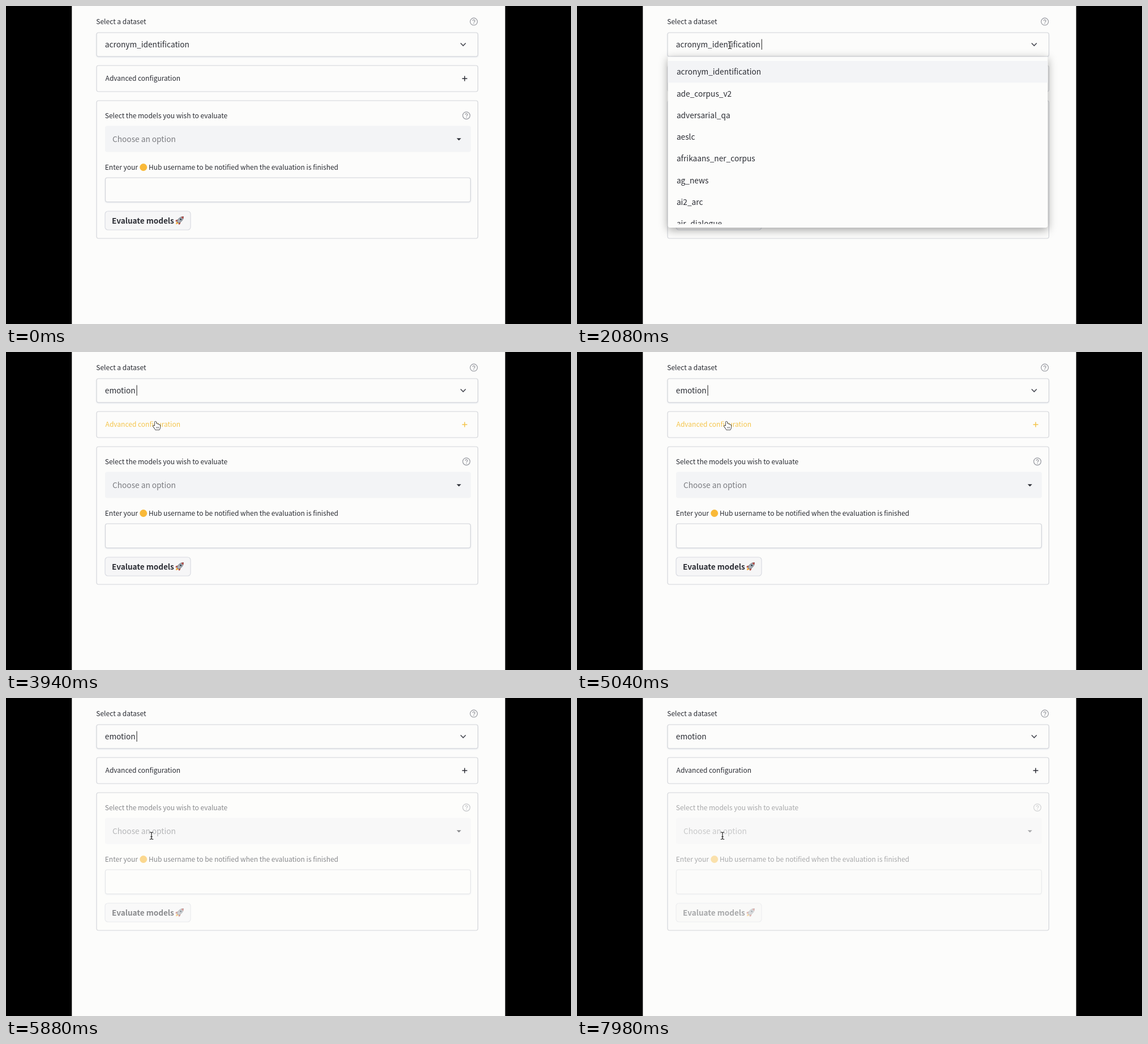
An HTML page with a canvas that plays this animation: 998x561 px, repeating every 8 s.

```html
<!DOCTYPE html>
<html lang="en">
<head>
<meta charset="utf-8">
<title>Model evaluation form</title>
<style>
  html, body { margin: 0; width: 100%; height: 100%; overflow: hidden; background: #000; }
  canvas { display: block; width: 998px; height: 561px; }
</style>
</head>
<body>
<canvas id="stage"></canvas>
<script>
const W = 998, H = 561, LOOP = 8000;
const canvas = document.getElementById('stage');
const ctx = canvas.getContext('2d');
const dpr = window.devicePixelRatio || 1;
canvas.width = W * dpr;
canvas.height = H * dpr;

const FONT = '"Noto Sans CJK JP", "Noto Sans CJK SC", "Noto Sans CJK KR", "Noto Sans CJK", "Noto Sans", sans-serif';
const BODY = `13.7px ${FONT}`;
const LABEL = `12px ${FONT}`;
const BOLD = `600 13.55px ${FONT}`;
const INK = '#2b2d34', PAPER = '#fcfcfb', LINE = '#d3d5da', ACCENT = '#f4c54c';

const DATASETS = ['acronym_identification', 'ade_corpus_v2', 'adversarial_qa', 'aeslc',
  'afrikaans_ner_corpus', 'ag_news', 'ai2_arc', 'air_dialogue'];
const MATCHES = ['emotion', 'mteb/emotion', 'SetFit/emotion', 'Tolvo/emotion_nl',
  'Hamzo/emotion-raw', 'lumoko/emotion-with-length', 'Datatang/Emotional_Video_Data',
  'vesatorimeh/emotion-with-length'];

// Event times in ms
const FOCUS = 900, OPEN = 1700, PICK = 3630, FADE = 5040, BLINK = 1100;
const KEYS = [2440, 2520, 2600, 2680, 2760, 2880, 2960];

// Pointer stops: time, x, y
const PATH = [[40, 568, 463], [800, 270, 69], [3340, 270, 69], [3560, 264, 123],
  [5180, 264, 123], [5600, 257, 243]];

const clamp = v => Math.min(1, Math.max(0, v));
const smooth = v => v * v * (3 - 2 * v);

function pointerAt(t) {
  if (t < PATH[0][0] || (t >= KEYS[0] && t < 3340)) return null;
  let i = 0;
  while (i < PATH.length - 2 && t >= PATH[i + 1][0]) i++;
  const [t0, x0, y0] = PATH[i], [t1, x1, y1] = PATH[i + 1];
  const k = smooth(clamp((t - t0) / (t1 - t0)));
  return { x: x0 + (x1 - x0) * k, y: y0 + (y1 - y0) * k };
}

function text(str, x, y, font = BODY, color = INK) {
  ctx.font = font;
  ctx.fillStyle = color;
  ctx.fillText(str, x, y);
}

function box(x, y, w, h, r, fill, stroke) {
  ctx.beginPath();
  ctx.roundRect(x, y, w, h, r);
  if (fill) { ctx.fillStyle = fill; ctx.fill(); }
  if (stroke) { ctx.strokeStyle = stroke; ctx.lineWidth = 1.2; ctx.stroke(); }
}

// Fill with a soft shadow below it
function raised(color, blur, dy, ...shape) {
  ctx.save();
  ctx.shadowColor = color;
  ctx.shadowBlur = blur * dpr;
  ctx.shadowOffsetY = dy * dpr;
  box(...shape, PAPER);
  ctx.restore();
}

function input(x, y, w, h) {
  raised('rgba(120,135,170,.3)', 2.5, 1, x, y, w, h, 3.5);
  box(x, y, w, h, 3.5, PAPER, LINE);
}

function line(points, color, width) {
  ctx.beginPath();
  points.forEach(([x, y], i) => i ? ctx.lineTo(x, y) : ctx.moveTo(x, y));
  ctx.strokeStyle = color;
  ctx.lineWidth = width;
  ctx.stroke();
}

function disc(x, y, r, color) {
  ctx.beginPath();
  ctx.arc(x, y, r, 0, 7);
  ctx.fillStyle = color;
  ctx.fill();
}

function help(x, y) {
  ctx.beginPath();
  ctx.arc(x, y, 6.4, 0, 7);
  ctx.strokeStyle = '#96989f';
  ctx.lineWidth = 1.2;
  ctx.stroke();
  ctx.beginPath();
  ctx.arc(x, y - 1.4, 1.9, Math.PI, Math.PI * 2.35);
  ctx.lineTo(x, y + 1.5);
  ctx.stroke();
  disc(x, y + 3.5, 0.8, '#96989f');
}

function rocket(x, y) {
  ctx.save();
  ctx.translate(x, y);
  ctx.rotate(Math.PI / 4);
  ctx.fillStyle = '#f2a83b';
  ctx.beginPath();
  ctx.moveTo(-2, 4);
  ctx.quadraticCurveTo(-2.4, 7, 0, 9.5);
  ctx.quadraticCurveTo(2.4, 7, 2, 4);
  ctx.fill();
  ctx.fillStyle = '#b6463f';
  ctx.beginPath();
  ctx.moveTo(-2, 0);
  ctx.lineTo(-5, 3.5);
  ctx.lineTo(-4.6, 6.5);
  ctx.lineTo(0, 4);
  ctx.lineTo(4.6, 6.5);
  ctx.lineTo(5, 3.5);
  ctx.lineTo(2, 0);
  ctx.fill();
  ctx.fillStyle = '#a9b0b8';
  ctx.strokeStyle = '#5e6670';
  ctx.lineWidth = 0.7;
  ctx.beginPath();
  ctx.moveTo(0, -9.5);
  ctx.bezierCurveTo(4.4, -5, 3.8, 1, 2.2, 4.8);
  ctx.lineTo(-2.2, 4.8);
  ctx.bezierCurveTo(-3.8, 1, -4.4, -5, 0, -9.5);
  ctx.fill();
  ctx.stroke();
  ctx.fillStyle = '#b6463f';
  ctx.beginPath();
  ctx.moveTo(0, -9.5);
  ctx.quadraticCurveTo(2, -7.6, 2.5, -6);
  ctx.lineTo(-2.5, -6);
  ctx.quadraticCurveTo(-2, -7.6, 0, -9.5);
  ctx.fill();
  disc(0, -2.6, 1.6, '#3d4955');
  ctx.restore();
}

function selectField(t) {
  text('Select a dataset', 159.3, 32.2, LABEL);
  help(826.3, 27.6);
  input(160, 47, 673.5, 42);
  line([[803, 65.5], [807.5, 70], [812, 65.5]], '#4b4d55', 1.7);

  const typed = KEYS.filter(k => t >= k).length;
  const value = typed ? 'emotion'.slice(0, typed) : DATASETS[0];
  text(value, 174.8, 72.7);

  const typing = typed > 0 && t < PICK;
  const since = t - (t < PICK ? FOCUS : PICK);
  if (t >= FOCUS && (typing || since % BLINK < BLINK / 2)) {
    const x = 174.8 + ctx.measureText(value).width + (typing ? 0.8 : 2.4);
    line([[x, 58.5], [x, 77]], '#333', 1.1);
  }
}

function advanced(hover) {
  const color = hover ? ACCENT : INK;
  box(160, 105, 673.5, 46, 3.5, PAPER, LINE);
  text('Advanced configuration', 175.6, 132.4, LABEL, color);
  line([[805.7, 128], [814.7, 128]], color, 1.5);
  line([[810.2, 123.5], [810.2, 132.5]], color, 1.5);
}

function form(opacity) {
  text('Select the models you wish to evaluate', 174.8, 197.8, LABEL);
  help(813.2, 193.2);
  box(175, 211.5, 646, 46, 3.5, '#f3f4f6');
  text('Choose an option', 188, 239.5, BODY, '#7b7c81');
  ctx.beginPath();
  ctx.moveTo(796, 233.3);
  ctx.lineTo(804, 233.3);
  ctx.lineTo(800, 237.3);
  ctx.fillStyle = INK;
  ctx.fill();

  text('Enter your', 174.8, 288.9, LABEL);
  disc(242.7, 284.5, 6.5, '#f9b938');
  text('Hub username to be notified when the evaluation is finished', 252, 288.9, LABEL);
  input(175.5, 303, 645, 42.5);
  box(175, 362, 151, 33, 5, '#f6f6f7', '#d9dbe1');
  text('Evaluate models', 187, 383.8, BOLD);
  rocket(306.8, 378.2);

  // A veil of paper fades the contents while the frame stays solid
  ctx.save();
  ctx.globalAlpha = 1 - opacity;
  box(160, 167, 673.5, 243, 3.5, PAPER);
  ctx.restore();
  box(160, 167, 673.5, 243, 3.5, null, LINE);
}

function dropdown(items) {
  raised('rgba(0,0,0,.36)', 16, 4, 160.5, 89.5, 671, 301.5, [0, 0, 4, 4]);
  box(160.5, 97, 671, 38.3, 0, '#f3f4f6');
  ctx.save();
  ctx.beginPath();
  ctx.rect(161, 90, 670, 294.5);
  ctx.clip();
  items.forEach((name, i) => text(name, 175.9, 121.2 + i * 38.3));
  ctx.restore();
}

function outlined(path, fill, edge) {
  ctx.lineJoin = 'round';
  ctx.strokeStyle = edge;
  ctx.lineWidth = 1.5;
  ctx.stroke(path);
  ctx.fillStyle = fill;
  ctx.fill(path);
}

const ARROW = new Path2D('M0 0V13L3 10.3L5 15L7 14.1L5 9.6H9Z');
const HAND = new Path2D('M-1.2 .9C-1.2-.5 1.2-.5 1.2 .9V5C2-.1 3.9 4 3.9 5C4.6 4 6.2 4.6 6.2 5.8C7 5 8.3 5.5 8.3 7V10C8.3 12 7 12.5 6.8 14H-.2C-.6 11.6-3.8 9.5-4 7.6C-3.8 6.2-2.2 6.6-1.2 8Z');
const BEAM = new Path2D('M-3.2-6.3Q-.4-6.3 0-5Q.4-6.3 3.2-6.3M0-5V5M-3.2 6.3Q-.4 6.3 0 5Q.4 6.3 3.2 6.3M-1.6 1.7H1.6');

function pointer(p, kind) {
  ctx.save();
  ctx.translate(p.x, p.y);
  if (kind === 'beam') {
    for (const [color, width] of [['#fff', 2.8], ['#222', 1.2]]) {
      ctx.strokeStyle = color;
      ctx.lineWidth = width;
      ctx.stroke(BEAM);
    }
  } else if (kind === 'hand') {
    outlined(HAND, '#fff', '#222');
    for (const x of [1.8, 3.7, 5.6]) line([[x, 9], [x, 11.8]], '#444', 0.7);
  } else {
    outlined(ARROW, '#111', '#fff');
  }
  ctx.restore();
}

function render(t) {
  ctx.setTransform(dpr, 0, 0, dpr, 0, 0);
  ctx.fillStyle = '#000';
  ctx.fillRect(0, 0, W, H);
  ctx.fillStyle = PAPER;
  ctx.fillRect(116.3, 0, 765.4, H);

  const p = pointerAt(t);
  const open = t >= OPEN && t < PICK;
  const within = (x, y, w, h) => p && p.x > x && p.x < x + w && p.y > y && p.y < y + h;
  const onHeader = !open && within(160, 105, 673, 46);
  const onField = within(160, 47, 673, 42) || within(175, 211, 646, 47) || within(175, 303, 646, 43);

  selectField(t);
  advanced(onHeader);
  form(1 - 0.6 * Math.pow(clamp((t - FADE) / 1000), 1.7));
  if (open) dropdown(t < KEYS[0] ? DATASETS : MATCHES);
  if (p) {
    const onList = open && within(160, 89, 672, 302);
    pointer(p, onHeader || onList ? 'hand' : onField ? 'beam' : 'arrow');
  }
}

const start = performance.now();
function tick() {
  render((performance.now() - start) % LOOP);
  requestAnimationFrame(tick);
}
tick();
</script>
</body>
</html>
```
